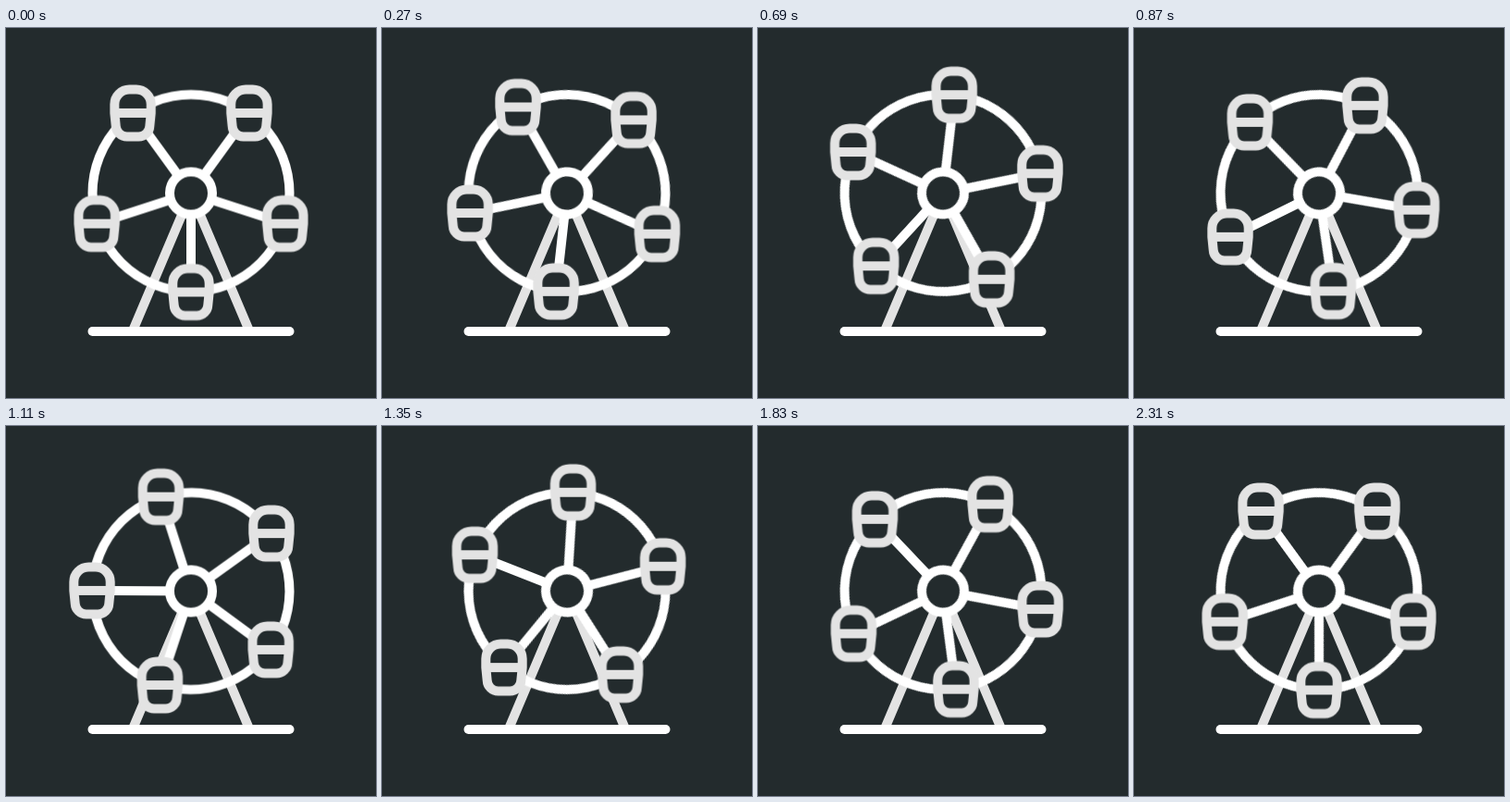
An HTML page that plays this animation: 400 px wide and 400 px high, repeating every 2340 ms.

```html
<!DOCTYPE html>
<html lang="en">
<head>
<meta charset="utf-8">
<title>Ferris wheel</title>
<style>
  html, body { margin: 0; width: 100%; height: 100%; overflow: hidden; background: #232b2d; }
  svg { display: block; width: 100%; height: 100%; }
  .line { fill: none; stroke: #fff; stroke-width: 10; }
  .soft { stroke: #e3e3e3; }
  .solid { fill: #232b2d; }
</style>
</head>
<body>
<svg viewBox="0 0 400 400">
  <path class="line soft" d="M138 325 L200 178.5 L262 325"/>
  <path class="line" stroke-linecap="round" d="M93.5 328 H306.5"/>
  <g transform="translate(200 178.5)">
    <g id="wheel">
      <circle class="line" r="106.5"/>
      <g id="spokes"></g>
      <circle class="line solid" r="23"/>
      <g id="cabins"></g>
    </g>
  </g>
</svg>
<script>
  const COUNT = 5, RADIUS = 107, STEP = 360 / COUNT;
  const TURN = 2 * STEP;
  const timing = { duration: 2340, iterations: Infinity, easing: 'cubic-bezier(.333, 0, .407, 1)' };
  const CABIN = 'M-19.7 0 V-9.5 A16 16 0 0 1 -3.7 -25.5 H3.7 A16 16 0 0 1 19.7 -9.5 V0' +
    ' L18.3 14 A12 12 0 0 1 6.4 25.5 H-6.4 A12 12 0 0 1 -18.3 14 Z M-19.7 0 H19.7';

  const byId = id => document.getElementById(id);

  function add(parent, tag, attrs = {}) {
    const el = document.createElementNS('http://www.w3.org/2000/svg', tag);
    for (const key in attrs) el.setAttribute(key, attrs[key]);
    return parent.appendChild(el);
  }

  const spin = (el, angle) => el.animate(
    [{ transform: 'rotate(0deg)' }, { transform: `rotate(${angle}deg)` }], timing);

  const moves = [spin(byId('wheel'), TURN)];
  for (let i = 0; i < COUNT; i++) {
    const a = i * STEP * Math.PI / 180;
    const x = -RADIUS * Math.sin(a), y = RADIUS * Math.cos(a);
    add(byId('spokes'), 'line', { class: 'line', x2: x, y2: y });
    const seat = add(byId('cabins'), 'g', { transform: `translate(${x} ${y})` });
    const cabin = add(seat, 'g');
    add(cabin, 'path', { class: 'line soft solid', d: CABIN });
    // Cabins turn back against the wheel to stay upright.
    moves.push(spin(cabin, -TURN));
  }
  const start = document.timeline.currentTime;
  moves.forEach(m => { m.startTime = start; });
</script>
</body>
</html>
```
